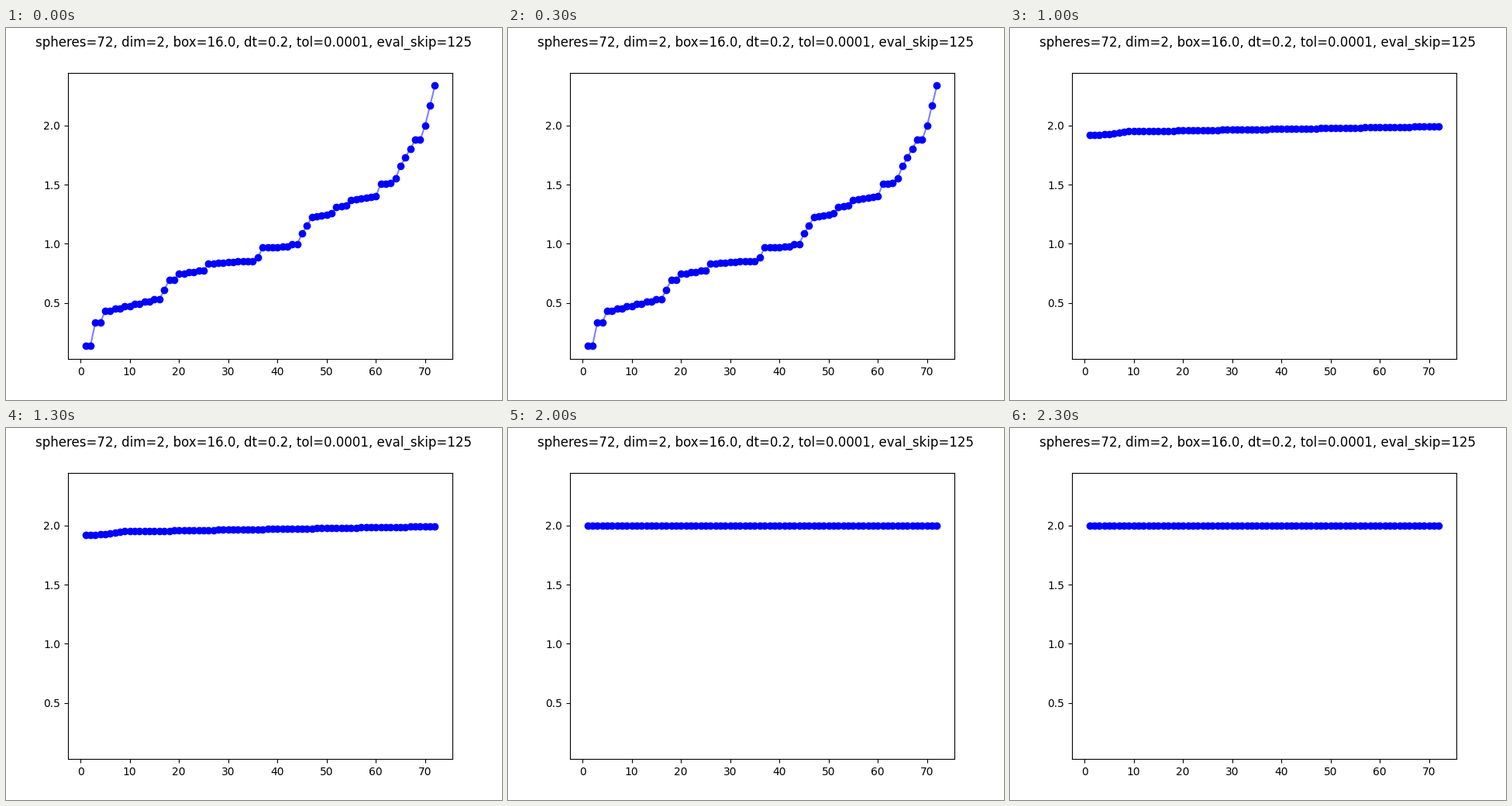
These frames come from a looping animation (640 px wide and 480 px high, 2.5 s). A matplotlib script:

```python
import numpy as np
import matplotlib.pyplot as plt
from matplotlib.animation import FuncAnimation

COUNT = 72
TITLE = f"spheres={COUNT}, dim=2, box=16.0, dt=0.2, tol=0.0001, eval_skip=125"

x = np.arange(1, COUNT + 1)


def through(at, *points):
    """Piecewise linear curve through (x, y) points, flat beyond the ends."""
    return np.interp(at, *zip(*points))


def pair_start(i):
    """Close neighbours share a distance: pairs, broken by two single spheres."""
    singles_passed = (i > 17).astype(int) + (i > 36)
    paired = i - (i - 1 + singles_passed) % 2
    return np.where(i < 45, paired, i)


curves = [
    through(pair_start(x),
            (1, 0.136), (3, 0.335), (5, 0.431), (15, 0.53), (17, 0.61),
            (18, 0.694), (20, 0.747), (24, 0.773), (26, 0.832), (34, 0.855),
            (36, 0.883), (37, 0.968), (41, 0.974), (43, 0.998), (45, 1.085),
            (47, 1.224), (51, 1.256), (52, 1.308), (54, 1.323), (55, 1.367),
            (60, 1.401), (61, 1.505), (63, 1.512), (64, 1.551), (65, 1.656),
            (68, 1.878), (69, 1.878), (70, 1.998), (72, 2.336)),
    through(x, (2, 1.828), (3, 1.854), (8, 1.867), (13, 1.867),
            (18, 1.887), (35, 1.918), (66, 1.964), (72, 1.984)),
    through(x, (3, 1.9185), (9, 1.9495), (72, 1.992)),
    np.linspace(1.9862, 1.9999, COUNT),
    np.full(COUNT, 2.0),
]

fig, ax = plt.subplots(figsize=(6.4, 4.8), dpi=100)
fig.suptitle(TITLE)
line, = ax.plot(x, curves[0], "b-", alpha=0.5)
dots, = ax.plot(x, curves[0], "bo")
low, high = curves[0][[0, -1]]
margin = 0.05 * (high - low)
ax.set_ylim(low - margin, high + margin)


def update(frame):
    for artist in (line, dots):
        artist.set_ydata(curves[frame])
    return line, dots


anim = FuncAnimation(fig, update, frames=len(curves), interval=500,
                     repeat=True, repeat_delay=0)
plt.show()
```
